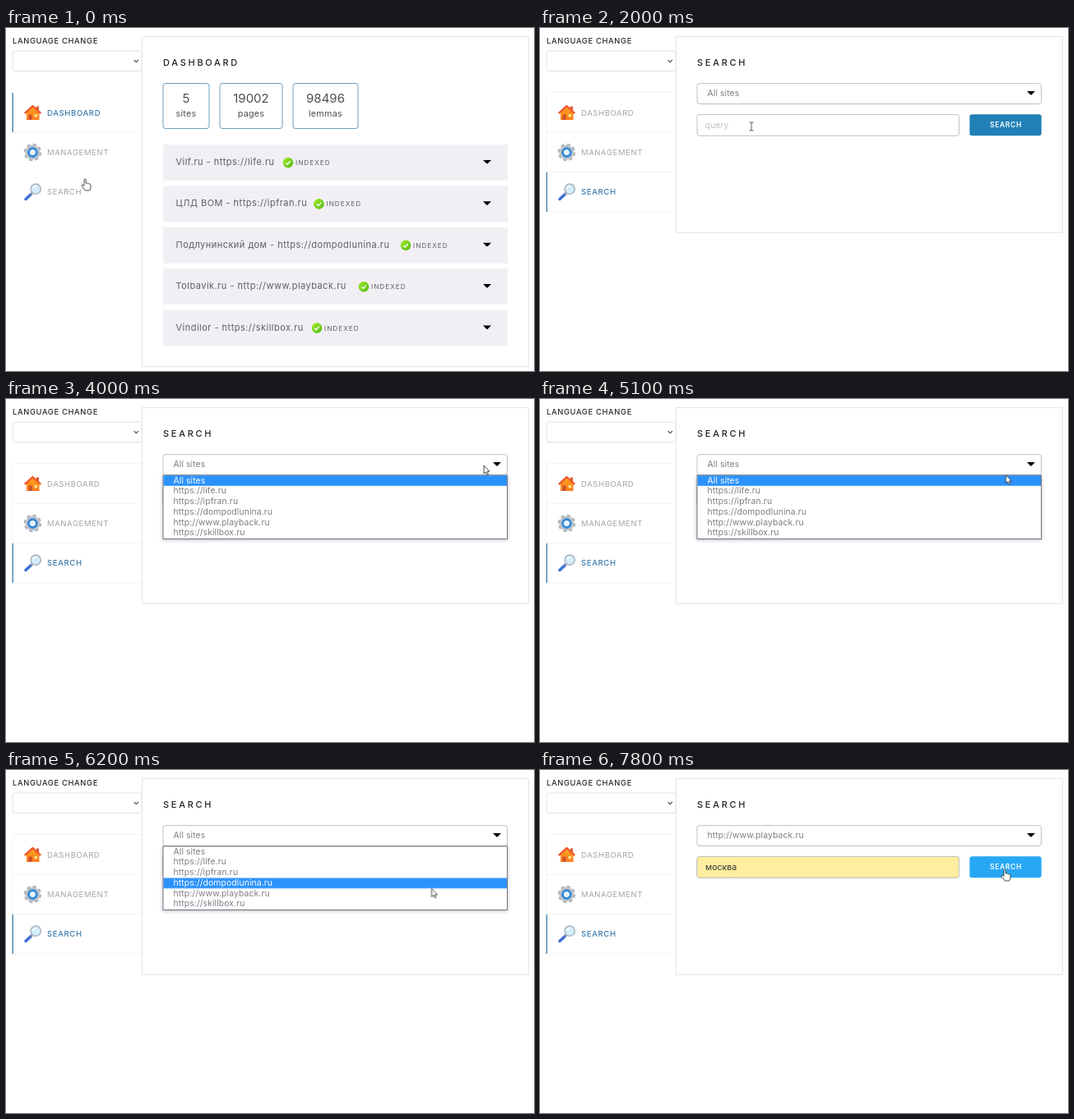
Animation of 642x418 px, one loop 8000 ms. Source, as an HTML page:

```html
<!DOCTYPE html>
<html lang="en">
<head>
<meta charset="utf-8">
<title>Search dashboard</title>
<style>
html, body { margin: 0; width: 100%; height: 100%; overflow: hidden; background: #fff; }
svg { display: block; width: 642px; height: 418px; font-family: Inter, "Open Sans", sans-serif; }
.line { fill: none; stroke: #e6e6ea; }
.rule { fill: none; stroke: #f3f3f5; }
.field { fill: #fff; stroke: #c0c0c4; }
.bar { stroke: #4682ae; stroke-width: 1.4; }
.nav { font-size: 9.5px; fill: #a5a5a9; letter-spacing: .6px; }
.active { fill: #3a7aab; font-weight: 500; letter-spacing: .65px; }
.title { font-size: 11px; font-weight: 500; fill: #222; letter-spacing: 2.7px; }
.stat { text-anchor: middle; fill: #504e54; }
.site { font-size: 11px; fill: #605d65; letter-spacing: .48px; }
.badge { font-size: 8.2px; fill: #605d65; letter-spacing: 1px; }
.option { font-size: 10.4px; fill: #807d85; letter-spacing: .1px; }
.query { font-size: 10.6px; }
.hint { font: 8px Roboto, sans-serif; fill: #8d8b90; letter-spacing: .05px; }

.anim, .cursor { animation: 8s step-end infinite; }
.dash { animation-name: dash; }
.search { animation-name: search; }
.placeholder { animation-name: placeholder; }
.caret { animation-name: caret; }
.filled { animation-name: filled; }
.hints { animation-name: hints; }
.list { animation-name: list; }
.before { animation-name: before; }
.after { animation-name: after; }
.mark { animation-name: mark; }
.hand { animation-name: hand; }
.arrow { animation-name: arrow; }
.beam { animation-name: beam; }
.button { fill: #2180b6; animation: button 8s linear infinite; }
.cursor { animation-name: move; animation-timing-function: linear; }

@keyframes dash { 0% { visibility: visible } 11.25%, 100% { visibility: hidden } }
@keyframes search { 0% { visibility: hidden } 11.25%, 100% { visibility: visible } }
@keyframes placeholder { 0% { visibility: hidden } 11.25% { visibility: visible } 38.75%, 100% { visibility: hidden } }
@keyframes filled { 0% { visibility: hidden } 38.75%, 100% { visibility: visible } }
@keyframes hints { 0% { visibility: hidden } 37.5% { visibility: visible } 42.5%, 100% { visibility: hidden } }
@keyframes list { 0% { visibility: hidden } 48.75% { visibility: visible } 87.5%, 100% { visibility: hidden } }
@keyframes before { 0% { visibility: hidden } 11.25% { visibility: visible } 87.5%, 100% { visibility: hidden } }
@keyframes after { 0% { visibility: hidden } 87.5%, 100% { visibility: visible } }
@keyframes caret {
  0% { visibility: hidden; transform: none }
  32.5% { visibility: visible; transform: none }
  38.75% { visibility: visible; transform: translateX(38px) }
  48.75%, 100% { visibility: hidden; transform: none }
}
@keyframes mark {
  0% { transform: none }
  67.5% { transform: translateY(12.8px) }
  72.5% { transform: translateY(25.6px) }
  75% { transform: translateY(38.4px) }
  78.75%, 100% { transform: translateY(51.2px) }
}
@keyframes button { 0%, 95% { fill: #2180b6 } 97.4%, 100% { fill: #27a8f4 } }
@keyframes hand { 0% { visibility: visible } 22.5% { visibility: hidden } 95%, 100% { visibility: visible } }
@keyframes arrow {
  0% { visibility: hidden } 22.5% { visibility: visible } 24.5% { visibility: hidden }
  35% { visibility: visible } 95%, 100% { visibility: hidden }
}
@keyframes beam { 0% { visibility: hidden } 24.5% { visibility: visible } 35%, 100% { visibility: hidden } }
@keyframes move {
  0%, 1% { transform: translate(96px, 184px) }
  2.5%, 5% { transform: translate(90px, 189px) }
  8.75%, 20.5% { transform: translate(80px, 195px) }
  25% { transform: translate(257px, 120px) }
  28.75%, 32.5% { transform: translate(281px, 120px) }
  35% { transform: translate(282px, 134px) }
  37.5% { transform: translate(283px, 144px) }
  40%, 42.5% { transform: translate(284px, 149px) }
  47.5%, 60% { transform: translate(581px, 81px) }
  70% { transform: translate(542px, 112px) }
  71.25% { transform: translate(538px, 117px) }
  77.5% { transform: translate(517.5px, 144.5px) }
  81.25%, 92.5% { transform: translate(516px, 147px) }
  97.5%, 100% { transform: translate(565px, 121px) }
}
</style>
</head>
<body>
<svg viewBox="0 0 642 418">
  <defs>
    <filter id="shadow" x="-20%" y="-20%" width="140%" height="150%">
      <feDropShadow dx="0" dy="1" stdDeviation="2" flood-color="#504a70" flood-opacity=".4"/>
    </filter>
    <linearGradient id="lime" x2="1" y2="1"><stop stop-color="#a4ea2a"/><stop offset="1" stop-color="#4fbb12"/></linearGradient>
    <linearGradient id="flame" x2="0" y2="1"><stop stop-color="#ffa51e"/><stop offset="1" stop-color="#ff7a1c"/></linearGradient>
    <clipPath id="marked"><rect class="anim mark" x="191" y="93" width="419" height="12.8"/></clipPath>
    <path id="down" d="M-5 -2.6H5L.8 1.6Q0 2.3 -.8 1.6Z"/>
    <g id="check">
      <circle r="6.3" fill="url(#lime)"/>
      <path d="M-2.8 .2L-.7 2.3L2.8 -1.8" fill="none" stroke="#fff" stroke-width="1.4"/>
    </g>
  </defs>

  <text x="8" y="19" font-size="9.3" font-weight="500" letter-spacing=".68" fill="#29282c">LANGUAGE CHANGE</text>
  <rect x="8" y="28" width="157" height="24.5" rx="3" fill="#fff" stroke="#e0e2e8"/>
  <path d="M155.7 39L158.3 41.6L160.9 39" fill="none" stroke="#555" stroke-width="1.2"/>

  <path class="rule" d="M8 127.3H160"/>

  <g>
    <path d="M37 95.5h3v6h-3z" fill="#d65a32"/>
    <path d="M25 103L32.5 96L40.5 104V112H25Z" fill="url(#flame)"/>
    <path d="M22.8 104L32.5 95.2L42.2 104" fill="none" stroke="#f2592c" stroke-width="2.4" stroke-linejoin="round"/>
    <path d="M27.5 105.5h4v6.5h-4z" fill="#c9502c"/>
    <path d="M34.5 105h3.5v3.5h-3.5z" fill="#ffe08a"/>
  </g>
  <g transform="translate(32.4 151.6)" fill="none">
    <circle r="9.4" stroke="#b0b5bb" stroke-width="2.8" stroke-dasharray="4.2 3.18"/>
    <circle r="7" stroke="#bec2c8" stroke-width="4"/>
    <circle r="4.8" stroke="#348ad8" stroke-width="3"/>
    <circle r="3.2" fill="#e9f3fc"/>
  </g>
  <g>
    <path d="M30.5 202.5L24 208.5" stroke="#3f6fdb" stroke-width="3.6" stroke-linecap="round"/>
    <path d="M32 201.2L29.8 203.2" stroke="#8d93a1" stroke-width="2.2"/>
    <circle cx="36.2" cy="196.2" r="6.1" fill="#d3edfa" stroke="#b0b9c6" stroke-width="1.7"/>
    <path d="M32.8 195.3Q34 192.5 37 192.5" fill="none" stroke="#fff" stroke-width="1.4"/>
  </g>
  <text class="nav" x="50" y="155">MANAGEMENT</text>

  <g class="anim dash">
    <path class="bar" d="M8.2 79V127"/>
    <text class="nav active" x="50" y="106.5">DASHBOARD</text>
    <text class="nav" x="50" y="203.2">SEARCH</text>
    <rect class="line" x="165.5" y="10.5" width="470" height="402"/>
    <text class="title" x="191" y="45.8">DASHBOARD</text>
    <g id="stats"></g>
    <g id="sites"></g>
  </g>

  <g class="anim search">
    <path class="rule" d="M165 78.5H10Q8 78.5 8 80.5V176M8 175.7H165M8 224H165"/>
    <path class="bar" d="M8.2 176V224"/>
    <text class="nav" x="50" y="106.5">DASHBOARD</text>
    <text class="nav active" x="50" y="203.2">SEARCH</text>
    <rect class="line" x="165.5" y="10.5" width="470" height="239"/>
    <text class="title" x="191" y="45.8">SEARCH</text>
    <rect class="field" x="191" y="67.7" width="418.5" height="24.8" rx="3"/>
    <text class="option anim before" x="203.5" y="83">All sites</text>
    <text class="option anim after" x="203.5" y="83">http://www.playback.ru</text>
    <use href="#down" x="597" y="79.7"/>
    <rect class="field" x="191" y="105.5" width="318.5" height="25.8" rx="3"/>
    <text class="query anim placeholder" x="200.5" y="122" fill="#c2c1c5">query</text>
    <rect class="button" x="522.4" y="105.3" width="87.3" height="25.9" rx="3"/>
    <text x="547" y="121" font-size="8.5" font-weight="600" letter-spacing=".65" fill="#fff">SEARCH</text>
  </g>
  <g class="anim filled">
    <rect x="191" y="105.5" width="318.5" height="25.8" rx="3" fill="#ffeda0" stroke="#c0c0c4"/>
    <text class="query" x="201" y="122" fill="#333">москва</text>
  </g>
  <path class="anim caret" d="M201 112V124" stroke="#222"/>

  <g class="anim hints">
    <rect x="253" y="132" width="53" height="51" fill="#fff" filter="url(#shadow)"/>
    <rect x="253.5" y="133" width="52" height="25" fill="#f0f0f1"/>
    <text class="hint" x="261" y="150">москва</text>
    <text class="hint" x="261" y="172">работа</text>
  </g>

  <g class="option anim list">
    <rect x="191" y="93" width="418.5" height="77.5" fill="#fff" stroke="#77757c" filter="url(#shadow)"/>
    <g id="options"></g>
    <rect class="anim mark" x="191.5" y="93.2" width="417.5" height="12.6" fill="#2b92fb"/>
    <g clip-path="url(#marked)"><use href="#options" fill="#fff"/></g>
  </g>

  <g class="cursor" stroke="#222" stroke-width=".8" stroke-linejoin="round">
    <path class="anim arrow" d="M0 0V10L2.3 8L3.9 11.4L5.5 10.7L4 7.3H7Z" fill="#fff"/>
    <path class="anim beam" d="M-2.5 -5H-.8L0 -4.3L.8 -5H2.5M0 -4.3V4.3M-2.5 5H-.8L0 4.3L.8 5H2.5" fill="none"/>
    <path class="anim hand" fill="#fff" d="M-1 7.5V.8Q0 -.8 1.2 .8V5.2Q2.4 4.2 3.4 5.6Q4.6 4.8 5.4 6.2Q6.8 5.6 7 7.2V10Q7 12 5.6 14H.2Q-.8 12-3.2 9.6Q-4.6 8-3.4 7.2Q-2.4 6.7-1 8.5Z"/>
  </g>
</svg>
<script>
const fill = (id, items, draw) => {
  document.getElementById(id).innerHTML = items.map(draw).join('');
};

const stats = [[191, 56, '5', 'sites'], [260, 76, '19002', 'pages'], [349, 79, '98496', 'lemmas']];
fill('stats', stats, ([x, width, count, label]) => `
  <rect x="${x}" y="67.5" width="${width}" height="55" rx="3" fill="#fff" stroke="#6a9dc2"/>
  <text class="stat" x="${x + width / 2}" y="91" font-size="15">${count}</text>
  <text class="stat" x="${x + width / 2}" y="107.7" font-size="10.8" letter-spacing=".25">${label}</text>`);

const sites = [
  ['Vilf.ru', 'https://life.ru', 343],
  ['ЦЛД ВОМ', 'https://ipfran.ru', 380.5],
  ['Подлунинский дом', 'https://dompodlunina.ru', 486],
  ['Tolbavik.ru', 'http://www.playback.ru', 435],
  ['Vindilor', 'https://skillbox.ru', 378]
];
fill('sites', sites, ([name, url, x], i) => `
  <g transform="translate(0 ${142 + i * 50.4})">
    <rect x="191" width="419" height="44" fill="#f1eff3"/>
    <text class="site" x="206.5" y="25">${name} - ${url}</text>
    <use href="#check" x="${x}" y="22"/>
    <text class="badge" x="${x + 9}" y="25">INDEXED</text>
    <use href="#down" x="585" y="21.5"/>
  </g>`);

fill('options', ['All sites', ...sites.map(site => site[1])], (label, i) =>
  `<text x="203.5" y="${102.7 + i * 12.75}">${label}</text>`);
</script>
</body>
</html>
```
